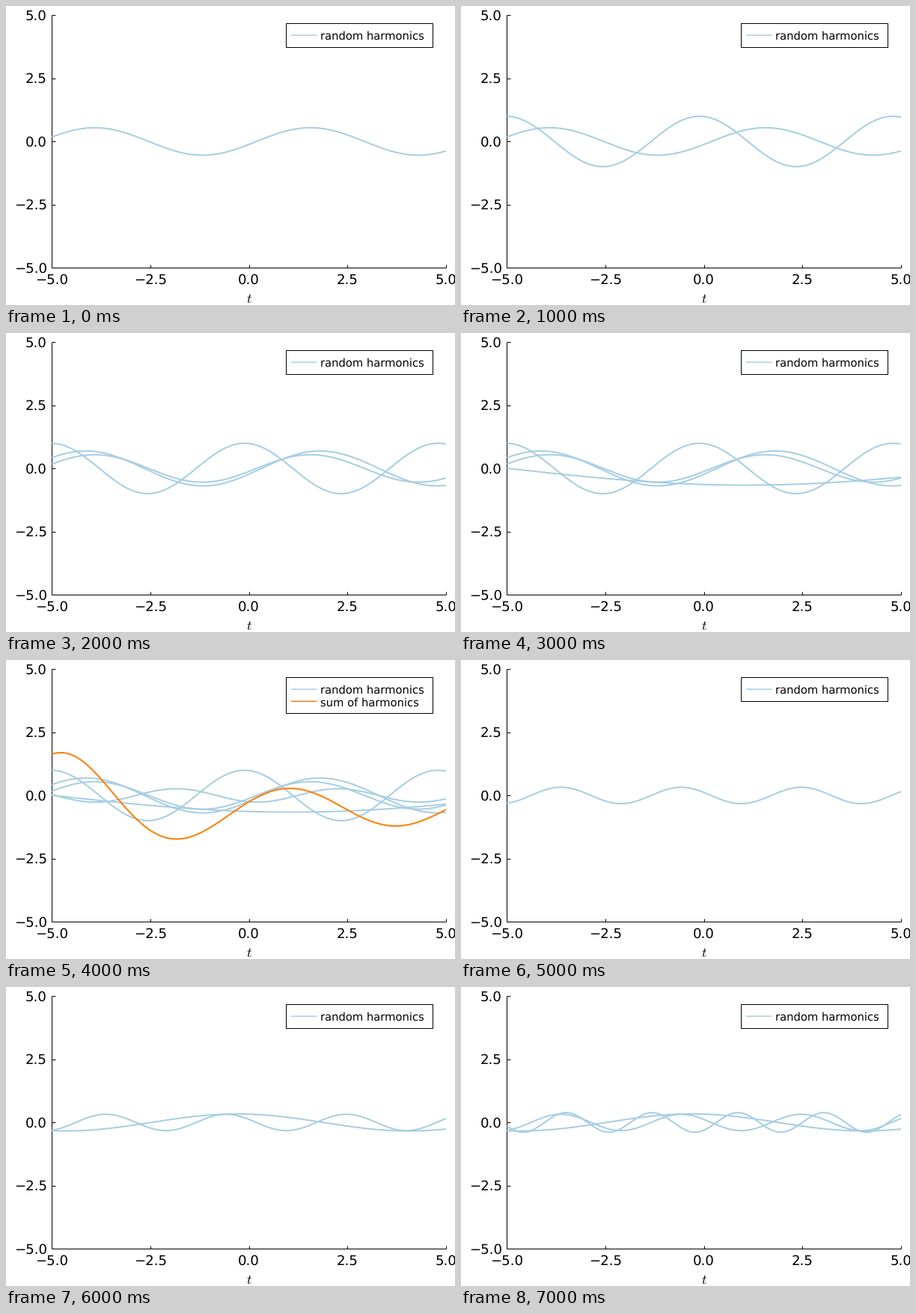
These frames come from a looping animation (600 px wide and 400 px high, 8 s). A matplotlib script:

```python
import numpy as np
import matplotlib.pyplot as plt
from matplotlib.animation import FuncAnimation
from matplotlib.patches import Rectangle

W, H, DPI = 600, 400, 100
PX = 72 / DPI  # points per pixel
BLUE, ORANGE = "#a6cee3", "#ff7f00"
LEFT, RIGHT, TOP, BOTTOM = 61.4, 588, 12, 350.4

# amplitude, angular frequency, time of a crest
SETS = [
    [(0.543, 1.1476, 1.56), (0.995, 1.28, -0.115), (0.69, 1.056, 1.806),
     (-0.66, 0.26, 1.07), (0.265, 1.53, 2.26)],
    [(0.323, 2.06, 2.47), (0.337, 0.72, -0.3), (0.387, 2.882, 0.86)],
]
STEPS = [(s, n + 1) for s, waves in enumerate(SETS) for n in range(len(waves))]
FULL = 5

plt.rcParams["font.family"] = "DejaVu Sans"
plt.rcParams["mathtext.fontset"] = "cm"
plt.rcParams["text.hinting"] = "none"

fig = plt.figure(figsize=(W / DPI, H / DPI), dpi=DPI, facecolor="white")
ax = fig.add_axes([0, 0, 1, 1])
ax.set_xlim(0, W)
ax.set_ylim(H, 0)
ax.axis("off")


def to_x(t):
    return LEFT + (t + 5) * (RIGHT - LEFT) / 10


def to_y(v):
    return BOTTOM - (v + 5) * (BOTTOM - TOP) / 10


def line(xs, ys, color="black", width=1.0, z=2, snap=None):
    return ax.plot(xs, ys, color=color, lw=width * PX, zorder=z,
                   solid_capstyle="butt", snap=snap)[0]


def text(x, y, s, size, ha="left"):
    return ax.text(x, y, s, fontsize=size * PX, ha=ha, va="baseline", zorder=6)


def draw_axes():
    line([LEFT, LEFT], [TOP, BOTTOM])
    line([LEFT, RIGHT], [BOTTOM, BOTTOM])
    for v in np.arange(-5, 5.1, 2.5):
        x, y = to_x(v), to_y(v)
        label = f"{v:.1f}".replace("-", "\u2212")
        line([LEFT, LEFT + 4.5], [y, y])
        line([x, x], [BOTTOM, BOTTOM - 4.5])
        text(54.8, y + 6.4, label, 18.2, "right")
        text(x, 371.5, label, 18.2, "center")
    text(324.5, 397, "$t$", 18, "center")


def legend_row(y, label, color):
    return [line([381, 415.5], [y, y], color, 1.5, 6, snap=False),
            text(420.5, y + 6, label, 14.8)]


draw_axes()
time = np.linspace(-5, 5, 400)
waves = [line([], [], BLUE, 2, 3) for _ in range(FULL)]
total = line([], [], ORANGE, 2, 4)
box = ax.add_patch(Rectangle((374.3, 22.7), 196, 32, fc="white", ec="black",
                             lw=PX, zorder=5))
legend_row(39.1, "random harmonics", BLUE)
sum_row = legend_row(55.3, "sum of harmonics", ORANGE)


def update(i):
    group, count = STEPS[i]
    curves = [a * np.cos(w * (time - p)) for a, w, p in SETS[group][:count]]
    for k, wave in enumerate(waves):
        wave.set_visible(k < count)
        if k < count:
            wave.set_data(to_x(time), to_y(curves[k]))
    done = count == FULL
    total.set_data(to_x(time), to_y(sum(curves)))
    for item in [total, *sum_row]:
        item.set_visible(done)
    box.set_height(48 if done else 32)
    return [*waves, total, box, *sum_row]


anim = FuncAnimation(fig, update, frames=len(STEPS), interval=1000,
                     repeat=True, repeat_delay=0)
plt.show()
```
